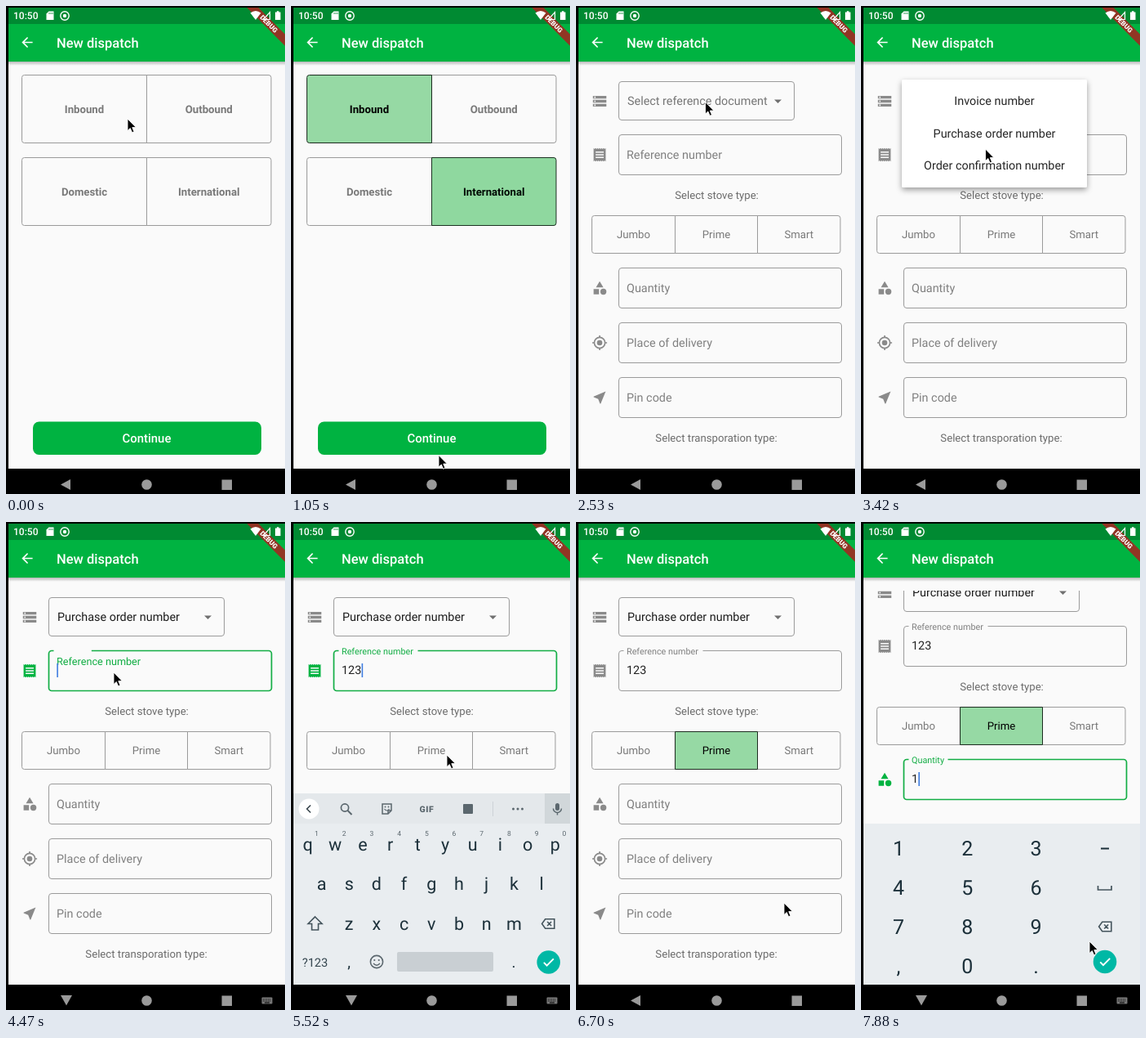
Write an HTML page that moves like this. It is 342 by 597 pixels and loops after 8000 ms.

```html
<!DOCTYPE html>
<html lang="en">
<head>
<meta charset="utf-8">
<title>New dispatch</title>
<style>
html, body { margin: 0; width: 100%; height: 100%; overflow: hidden; background: #000; }
svg { display: block; width: 100vw; height: 100vh; font-family: Roboto, sans-serif; text-rendering: geometricPrecision; }
</style>
</head>
<body>
<svg id="stage" viewBox="0 0 342 597"></svg>
<script>
const LOOP = 8000, TICK = 148.6;
const GREEN = '#00b341', BG = '#fafafa', PICK = '#96d9a4', LINE = '#9b9b9b', GREY = '#808080', KEY = '#1c303a';
const $ = id => document.getElementById(id);

// ---- drawing helpers ----
const text = (x, y, s, size, fill, more = 'text-anchor="middle"') =>
  `<text x="${x}" y="${y + size * 0.35}" font-size="${size}" fill="${fill}" ${more}>${s}</text>`;
const rect = (x, y, w, h, fill, more = '') =>
  `<rect x="${x}" y="${y}" width="${w}" height="${h}" fill="${fill}" ${more}/>`;
const circle = (x, y, r, fill, more = '') => `<circle cx="${x}" cy="${y}" r="${r}" fill="${fill}" ${more}/>`;
const path = (d, more) => `<path d="${d}" ${more}/>`;
const icon = (x, y, body, fill, more = '', k = 0.824) =>
  `<g transform="translate(${x - 12 * k} ${y - 12 * k}) scale(${k})" fill="${fill}" ${more}>${body}</g>`;
const stroke = (c, w) => `fill="none" stroke="${c}" stroke-width="${w}"`;

const ICON = {
  back: path('M20 11H7.8l5.6-5.6L12 4l-8 8 8 8 1.4-1.4L7.8 13H20z', ''),
  store: path('M2 4h20v4H2zM4 5v2h2V5zM2 10h20v4H2zM4 11v2h2v-2zM2 16h20v4H2zM4 17v2h2v-2z', 'fill-rule="evenodd"'),
  receipt: path('M3 22V2' + 'l1.5 1.5L6 2'.replace('L6 2', 'l1.5-1.5') + 'l1.5 1.5l1.5-1.5'.repeat(5) +
    'V22' + 'l-1.5-1.5l-1.5 1.5'.repeat(6) + 'zM6 7v2h12V7zM6 11v2h12v-2zM6 15v2h12v-2z', 'fill-rule="evenodd"'),
  shapes: path('M12 2l-5.5 9h11zM3 13.5h8v8H3z', '') + '<circle cx="17.5" cy="17.5" r="4.5"/>',
  target: '<circle cx="12" cy="12" r="4"/>' +
    '<circle cx="12" cy="12" r="8" fill="none" stroke="#8a8a8a" stroke-width="2"/>' +
    path('M11 1h2v3h-2zM11 20h2v3h-2zM1 11h3v2H1zM20 11h3v2h-3z', ''),
  arrow: path('M21 3L3 10.5v1l6.8 2.7 2.7 6.8h1z', ''),
  erase: path('M8 5H21.5V19H8L3 12zM11 9l6 6M17 9l-6 6', `${stroke('#44545c', 1.9)}`),
  check: path('M5 12.5l4.5 4.5L19.5 7', stroke('#fff', 2.3))
};

// A toggle cell whose outer corners are rounded.
function cell(x, y, w, h, rl, rr) {
  return `M${x + rl} ${y}h${w - rl - rr}q${rr} 0 ${rr} ${rr}v${h - 2 * rr}q0 ${rr} ${-rr} ${rr}` +
    `h${rl + rr - w}q${-rl} 0 ${-rl} ${-rl}v${2 * rl - h}q0 ${-rl} ${rl} ${-rl}z`;
}
function toggles(id, y, h, xs, names, bold) {
  const n = names.length, more = `text-anchor="middle" font-weight="${bold}"`;
  const one = (i, on) => {
    const w = xs[i + 1] - xs[i];
    return path(cell(xs[i], y, w, h, i ? 0 : 3, i == n - 1 ? 3 : 0),
      on ? `fill="${PICK}" stroke="#1d2b20"` : `fill="none" stroke="${LINE}"`) +
      text(xs[i] + w / 2, y + h / 2, names[i], 13.2, on ? '#000' : '#797979', more);
  };
  return names.map((_, i) => `<g id="${id}${i}off">${one(i, false)}</g>`).join('') +
    names.map((_, i) => `<g id="${id}${i}on">${one(i, true)}</g>`).join('');
}
function pick(id, i, on) {
  $(id + i + 'on').style.display = on ? '' : 'none';
  $(id + i + 'off').style.display = on ? 'none' : '';
}

const appBar = () => rect(3, 68, 339, 5, 'url(#shade)') + rect(3, 2, 339, 66, GREEN) +
  icon(26, 44.5, ICON.back, '#fff') +
  text(62, 45, 'New dispatch', 16.5, '#fff', 'font-weight="500"');

const field = (i, top, label, pic) =>
  `<g id="pic${i}">${icon(29, top + 25, pic, 'currentColor')}</g>` +
  rect(52.5, top + 0.5, 273, 49, 'none', `id="box${i}" rx="3.5" stroke="${LINE}"`) +
  rect(58.5, top - 2, 0, 5, BG, `id="gap${i}"`) +
  `<text id="label${i}" font-size="14.4" fill="${GREY}" transform="translate(62 ${top + 29.5})">${label}</text>` +
  `<text id="value${i}" x="62" y="${top + 29}" font-size="14.4" fill="#222"></text>` +
  rect(0, top + 16, 1.6, 17, '#3f7de0', `id="caret${i}"`);

const first = rect(3, 2, 339, 564, BG) +
  toggles('way', 84.5, 83, [19.5, 172.5, 325], ['Inbound', 'Outbound'], 700) +
  toggles('zone', 185.5, 83, [19.5, 172.5, 325], ['Domestic', 'International'], 700) +
  rect(33, 508.5, 280, 40.5, GREEN, 'rx="7.5"') +
  text(172.5, 529, 'Continue', 14.9, '#fff', 'text-anchor="middle" font-weight="500"') + appBar();

const second = rect(3, 2, 339, 564, BG) +
  `<g clip-path="url(#view)"><g id="list" color="#8a8a8a">` +
  icon(29, 116.5, ICON.store, '#8a8a8a') +
  rect(52.5, 92.5, 215, 47, 'none', `rx="3.5" stroke="${LINE}"`) +
  text(63, 116, '', 14.4, '#757575', 'id="choice"') +
  path('M243 114.5h9l-4.5 4.5z', 'fill="#707070"') +
  field(0, 157, 'Reference number', ICON.receipt) +
  text(172.5, 231.5, 'Select stove type:', 13.2, '#6c6c6c') +
  toggles('stove', 256.5, 46, [19.5, 121.5, 222.5, 324], ['Jumbo', 'Prime', 'Smart'], 400) +
  field(1, 320, 'Quantity', ICON.shapes) +
  field(2, 387, 'Place of delivery', ICON.target) +
  field(3, 454, 'Pin code', ICON.arrow) +
  text(172, 528, 'Select transporation type:', 13.2, '#6c6c6c') +
  '</g></g>' + appBar();

const menu = rect(50, 90, 227, 132, '#fff', 'id="sheet" rx="2" filter="url(#lift)"') +
  rect(50, 136, 227, 39.5, '#000', 'id="hit"') +
  ['Invoice number', 'Purchase order number', 'Order confirmation number']
    .map((s, i) => `<g id="item${i}">${text(163.5, 116 + i * 39.6, s, 14.4, '#262626')}</g>`).join('');

// ---- keyboards ----
const okKey = (x, y) => circle(x, y, 14.3, '#00b8a5') + icon(x, y, ICON.check, 'none');
const row = (s, x, y) => [...s].map((c, i) => text(x + i * 33.7, y, c, 21.5, KEY)).join('');
const dull = '#5b676e';
const letters = rect(3, 332, 339, 234, '#e9edf0') + rect(3, 332, 339, 37, '#e4e8eb') +
  rect(311, 332, 31, 37, '#d1d7da') +
  circle(22, 351, 12.5, '#fff') + path('M24 346.5l-4.5 4.5 4.5 4.5', stroke('#39464d', 1.6)) +
  circle(66, 349.5, 4.6, 'none', `stroke="${dull}" stroke-width="1.7"`) + path('M69.5 353l5 5', stroke(dull, 1.9)) +
  path('M112 345h11v8l-4 4h-7zM123 353h-4v4', stroke(dull, 1.5)) +
  path('M114.5 351q3 4 6 0', stroke(dull, 1.2)) + circle(115.5, 348.5, 0.9, dull) + circle(119.5, 348.5, 0.9, dull) +
  text(166.5, 351, 'GIF', 10.5, dull, 'text-anchor="middle" font-weight="900" letter-spacing=".6"') +
  rect(211, 345, 12, 12, dull, 'rx="1"') + rect(247, 342, 1, 18, '#ccd2d6') +
  [272.5, 278, 283.5].map(x => circle(x, 351, 1.5, dull)).join('') +
  rect(324, 344, 5, 9, dull, 'rx="2.5"') + path('M321.5 350.5a5 5 0 0 0 10 0M326.5 355.5v3', stroke(dull, 1.5)) +
  row('qwertyuiop', 20.5, 394) +
  [...'1234567890'].map((c, i) => text(31.5 + i * 33.7, 381, c, 8.5, dull)).join('') +
  row('asdfghjkl', 37.5, 442) + row('zxcvbnm', 71.2, 491) +
  path('M29.5 483l8.5 8.5h-4.5v7.5h-8v-7.5h-4.5z', stroke('#44545c', 1.6)) +
  icon(315, 491.5, ICON.erase, 'none') +
  text(29.5, 538.5, '?123', 14.6, '#34454e') + text(71, 538, ',', 19, KEY) +
  circle(105, 538, 7.6, 'none', `stroke="${dull}" stroke-width="1.6"`) +
  circle(102.3, 536, 1.1, dull) + circle(107.7, 536, 1.1, dull) + path('M101 540q4 4.5 8 0', stroke(dull, 1.4)) +
  rect(130, 526, 118, 24, '#c9cfd3', 'rx="2"') + text(273, 538, '.', 19, KEY) + okKey(315.7, 538.5);

const digits = rect(3, 369, 339, 197, '#e9edf0') +
  ['123', '456', '789', ',0.'].map((s, r) =>
    [...s].map((c, i) => text(46 + i * 84.3, 399.5 + r * 48, c, 25, KEY)).join('')).join('') +
  rect(294, 398.5, 10, 2, KEY) + path('M290.5 445v5h16.5v-5', stroke('#44545c', 1.7)) +
  icon(299, 495, ICON.erase, 'none') + okKey(299, 538);

// ---- system chrome ----
const status = rect(3, 2, 339, 20, '#000', 'opacity=".23"') +
  `<g transform="translate(342 2) rotate(45)">${rect(-34, 23, 68, 10, '#9c2d22', 'opacity=".93"')}` +
  text(0, 28, 'DEBUG', 8.3, '#fff', 'text-anchor="middle" font-weight="900"') + '</g>' +
  text(9, 12, '10:50', 12, '#fff', 'font-weight="500"') +
  path('M52.5 6.5h6v10.5h-9v-7.5z', 'fill="#fff"') + path('M53 8v2M55 8v2M57 8v2', stroke('#008a32', 0.8)) +
  circle(72, 12, 5.2, 'none', 'stroke="#fff" stroke-width="1.4"') + circle(72, 12, 2.2, '#fff') +
  path('M299.5 8.5q6.5-5 13 0l-6.5 8.5z', 'fill="#fff"') +
  path('M323.5 7.5v9h-8z', stroke('#fff', 1.2)) +
  path('M330 7.5h2v-1.3h2.5v1.3h2v9.5H330z', 'fill="#fff"');
const SOFT = '#9a9a9a';
const nav = rect(0, 566, 342, 31, '#000') + rect(0, 0, 3, 597, '#000') + rect(0, 0, 342, 2, '#000') +
  path('M67 585.5l12-6.5v13z', `id="navBack" fill="${SOFT}"`) +
  `<g id="navKeys">${path('M67 579h14l-7 12.5z', `fill="${SOFT}"`)}${rect(313.5, 581.5, 13, 8, '#777', 'rx="1"')}` +
  path('M315 584h10M315 586h10', 'stroke="#000" stroke-width="1" stroke-dasharray="1 1"') +
  path('M317 588h6', 'stroke="#000"') + '</g>' +
  circle(172.5, 585.5, 6.3, SOFT) + rect(264.5, 579.5, 12.5, 12.5, SOFT);

// Touch ripples: start, centre, and the box that holds them.
const TAPS = [
  [90, 149, 138, 19, 84, 153, 84, GREEN], [690, 235, 222, 172, 185, 153, 84, GREEN],
  [1560, 167, 531, 33, 508, 280, 41, '#fff'], [5580, 191, 285, 121, 256, 102, 47, GREEN]
];

$('stage').innerHTML = `<defs>
  <linearGradient id="shade" x2="0" y2="1"><stop stop-color="#000" stop-opacity=".26"/><stop offset="1" stop-color="#000" stop-opacity="0"/></linearGradient>
  <filter id="lift" x="-10%" y="-20%" width="120%" height="140%"><feDropShadow dx="0" dy="3" stdDeviation="3.5" flood-opacity=".38"/></filter>
  <clipPath id="screen">${rect(3, 2, 339, 564, '#000')}</clipPath>
  <clipPath id="view">${rect(3, 84, 339, 469, '#000', 'id="viewBox"')}</clipPath>
  ${TAPS.map((p, i) => `<clipPath id="tapBox${i}">${rect(p[3], p[4], p[5], p[6], '#000', 'rx="4"')}</clipPath>`).join('')}
  </defs>${rect(0, 0, 342, 597, '#000')}
  <g clip-path="url(#screen)"><g id="first">${first}</g><g id="second">${second}</g>
  ${TAPS.map((p, i) => `<g clip-path="url(#tapBox${i})">${circle(p[1], p[2], 0, p[7], `id="tap${i}"`)}</g>`).join('')}
  <g id="menu">${menu}</g><g id="letters">${letters}</g><g id="digits">${digits}</g>${status}</g>${nav}
  <g id="mouse">${path('M0 0V14.6L3.3 11.5 5.6 16.8 8 15.8 5.8 10.6H10.4z',
    'fill="#000" stroke="#fff" stroke-width=".9" stroke-linejoin="round"')}</g>`;

// ---- motion ----
const ramp = (t, a, b) => Math.min(1, Math.max(0, (t - a) / (b - a)));
function bezier(x1, y1, x2, y2) {
  const at = (s, a, b) => 3 * a * s * (1 - s) ** 2 + 3 * b * s * s * (1 - s) + s ** 3;
  return x => {
    let lo = 0, hi = 1;
    for (let i = 0; i < 24; i++) {
      const s = (lo + hi) / 2;
      if (at(s, x1, x2) < x) lo = s; else hi = s;
    }
    return x <= 0 ? 0 : x >= 1 ? 1 : at(lo, y1, y2);
  };
}
const swift = bezier(0.4, 0, 0.2, 1), easeIn = bezier(0.42, 0, 1, 1), glide = bezier(0.35, 0, 0.65, 1);

// Pointer stops: ms, x, y.
const PATH = [
  [0, 149, 138], [200, 149, 138], [600, 235, 222], [780, 235, 222], [1040, 181, 549.5], [1185, 184, 569],
  [1480, 167, 531], [1930, 167, 531], [2228, 168, 92], [2380, 160, 114], [2675, 157, 121], [2960, 157, 121],
  [3415, 152.5, 175], [3560, 151, 160], [3720, 151, 160], [4160, 132, 184], [5060, 132, 184],
  [5495, 191, 285], [5780, 191, 285], [6090, 314, 566], [6240, 313, 545], [6390, 313, 545],
  [6685, 255, 466], [6930, 180, 346], [7130, 180, 346], [7575, 288, 566], [7875, 280, 513], [8000, 280, 513]
];
function pointer(t) {
  let i = 0;
  while (i < PATH.length - 2 && PATH[i + 1][0] <= t) i++;
  const a = PATH[i], b = PATH[i + 1], k = glide(ramp(t, a[0], b[0]));
  return `translate(${a[1] + (b[1] - a[1]) * k} ${a[2] + (b[2] - a[2]) * k})`;
}

const move = (id, y) => $(id).setAttribute('transform', `translate(0 ${y})`);
const set = (id, name, v) => $(id).setAttribute(name, v);
const show = (id, on) => { $(id).style.display = on ? '' : 'none'; };

function fill(i, top, gap, focus, up, value, caret) {
  set('pic' + i, 'color', focus ? GREEN : '#8a8a8a');
  set('box' + i, 'stroke', focus ? '#12ad44' : LINE);
  set('box' + i, 'stroke-width', focus ? 1.7 : 1);
  set('gap' + i, 'width', gap * up);
  set('label' + i, 'fill', focus ? '#12ad44' : GREY);
  set('label' + i, 'transform', `translate(62 ${top + 29.5 - 24.2 * up}) scale(${1 - 0.25 * up})`);
  $('value' + i).textContent = value;
  set('caret' + i, 'x', 62.3 + 8.09 * value.length);
  show('caret' + i, caret);
}
const blink = (t, since) => t >= since && (t - since) % 1000 < 500;

function draw(t) {
  pick('way', 0, t > 140); pick('way', 1, false);
  pick('zone', 0, false); pick('zone', 1, t > 735);
  [0, 1, 2].forEach(i => pick('stove', i, i == 1 && t > 5640));

  const turn = ramp(t, 1695, 1995);
  show('second', turn > 0);
  set('second', 'opacity', easeIn(turn));
  move('second', 149 * (1 - swift(turn)));

  TAPS.forEach((p, i) => {
    const k = ramp(t, p[0], p[0] + 450);
    set('tap' + i, 'r', 150 * k);
    set('tap' + i, 'opacity', k < 1 ? 0.22 * (1 - k) : 0);
  });

  const chosen = t > 3700, open = ramp(t, 2890, 3190), shut = ramp(t, 3700, 3960);
  $('choice').textContent = chosen ? 'Purchase order number' : 'Select reference document';
  set('choice', 'fill', chosen ? '#1c1c1c' : '#757575');
  show('menu', open > 0 && shut < 1);
  set('menu', 'opacity', ramp(open, 0, 0.25) * (1 - shut));
  set('sheet', 'height', 47 + 85 * ramp(open, 0.25, 0.5));
  [0, 1, 2].forEach(i => set('item' + i, 'opacity', ramp(open, 0.35 + i * 0.17, 0.65 + i * 0.17)));
  set('hit', 'opacity', t > 3600 ? 0.08 : 0);

  const keys = swift(ramp(t, 4500, 4800)) - swift(ramp(t, 6330, 6620));
  const pad = swift(ramp(t, 7300, 7570));
  move('letters', 234 * (1 - keys));
  move('digits', 197 * (1 - pad));
  set('viewBox', 'height', 469 - Math.max(234 * keys, 197 * pad));
  move('list', -30 * swift(ramp(t, 7400, 7720)));

  const typed = '123'.slice(0, [4880, 5040, 5180].filter(a => t >= a).length);
  const inRef = t >= 4400 && t < 6350, inQty = t >= 6980;
  fill(0, 157, 97, inRef, swift(ramp(t, 4400, 4570)), typed, inRef && blink(t, t < 5180 ? 4400 : 5180));
  fill(1, 320, 48, inQty, swift(ramp(t, 6980, 7150)), t >= 7700 ? '1' : '', inQty && blink(t, t < 7700 ? 6980 : 7700));
  show('caret2', false); show('caret3', false);

  const typing = (t > 4450 && t < 6600) || t > 7250;
  show('navBack', !typing); show('navKeys', typing);
  set('mouse', 'transform', pointer(t));
}

// The screen refreshes at a steady coarse beat.
const start = performance.now();
let last = -1;
function frame() {
  const beat = Math.floor(((performance.now() - start) % LOOP + 0.5) / TICK);
  if (beat !== last) draw((last = beat) * TICK);
  requestAnimationFrame(frame);
}
frame();
</script>
</body>
</html>
```
